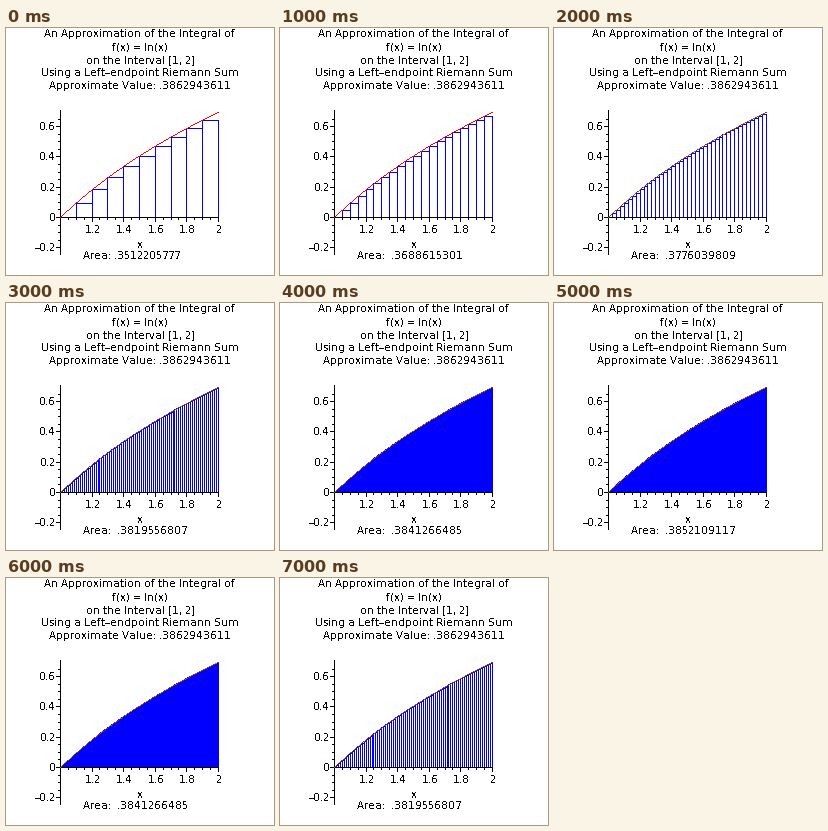
A matplotlib script for the animation above (8 s loop, 268 px wide and 247 px high).

```python
import numpy as np
import matplotlib.pyplot as plt
from matplotlib.animation import FuncAnimation
from matplotlib.collections import LineCollection

W, H, DPI = 268, 247, 100
PX = 72 / DPI  # points per pixel
X0, Y0 = 54, 189
SX, SY = 157.9, 151.5
COUNTS = [10, 20, 40, 80, 160, 320, 160, 80]
# sums as printed with ten-digit arithmetic
AREAS = {
    10: " .3512205777", 20: "  .3688615301", 40: "  .3776039809",
    80: "  .3819556807", 160: "  .3841266485", 320: "  .3852109117",
}
TITLE = [
    "An Approximation of the Integral of",
    "f(x) = ln(x)",
    "on the Interval [1, 2]",
    "Using a Left\u2013endpoint Riemann Sum",
    "Approximate Value: .3862943611",
]

plt.rcParams.update({
    "font.family": "DejaVu Sans",
    "text.antialiased": False,
    "text.hinting_factor": 1,
})
fig = plt.figure(figsize=(W / DPI, H / DPI), dpi=DPI, facecolor="white")
ax = fig.add_axes([0, 0, 1, 1])
ax.set_xlim(0, W)
ax.set_ylim(H, 0)
ax.axis("off")


def col(x):
    """Centre of the pixel column for a value on the x axis."""
    return np.floor(X0 + SX * (np.asarray(x) - 1) + 0.5) + 0.5


def row(y):
    """Centre of the pixel row for a value on the y axis."""
    return np.floor(Y0 - SY * np.asarray(y) + 0.5) + 0.5


def label(x, y, s, ha="center"):
    return ax.text(x, y, s, ha=ha, va="baseline", fontsize=10 * PX)


def lines(segs, color, z):
    group = LineCollection(segs, colors=color, linewidths=PX,
                           antialiaseds=False, snap=False, zorder=z)
    return ax.add_collection(group)


def draw_axes():
    left, base = X0 + .5, Y0 + .5
    segs = [[(left, 82), (left, 227)], [(X0, base), (col(2) + .5, base)]]
    for k in range(21):
        size = 5 if k and k % 4 == 0 else 3
        x = col(1 + k / 20)
        segs.append([(x, Y0), (x, Y0 + size)])
    for k in range(-4, 14):
        size = 5 if k % 4 == 0 else 3
        y = row(k / 20)
        segs.append([(X0 + 1 - size, y), (X0 + 1, y)])
    lines(segs, "black", 4)
    for v in (1.2, 1.4, 1.6, 1.8, 2):
        label(col(v) + 0.5, 205, f"{v:g}")
    for v in (-0.2, 0, 0.2, 0.4, 0.6):
        label(50, row(v) + 3, f"{v:g}".replace("-", "\u2013"), "right")


for i, text in enumerate(TITLE):
    label(134, 9 + 13 * i, text)
label(133.5, 220, "x")
draw_axes()

bars = lines([], "blue", 2)
t = 1 + np.arange(159) / SX
curve = lines([[(x - .5, y), (x + .5, y)]
               for x, y in zip(col(t), row(np.log(t)))], "red", 5)
flecked = ["#00c000" if k % 5 < 2 else "red" for k in range(len(t))]
area = label(77, 231, "", "left")


def update(k):
    n = COUNTS[k]
    edges = 1 + np.arange(n + 1) / n
    xs, ys = col(edges), row(np.log(edges[:-1]))
    base = Y0 + .5
    bars.set_segments([[(a, base), (a, y), (b, y), (b, base)]
                       for a, b, y in zip(xs[:-1], xs[1:], ys)])
    curve.set_color(flecked if n >= 40 else "red")
    area.set_text("Area:" + AREAS[n])
    return bars, curve, area


anim = FuncAnimation(fig, update, frames=len(COUNTS), interval=1000,
                     repeat=True, repeat_delay=0)
plt.show()
```
